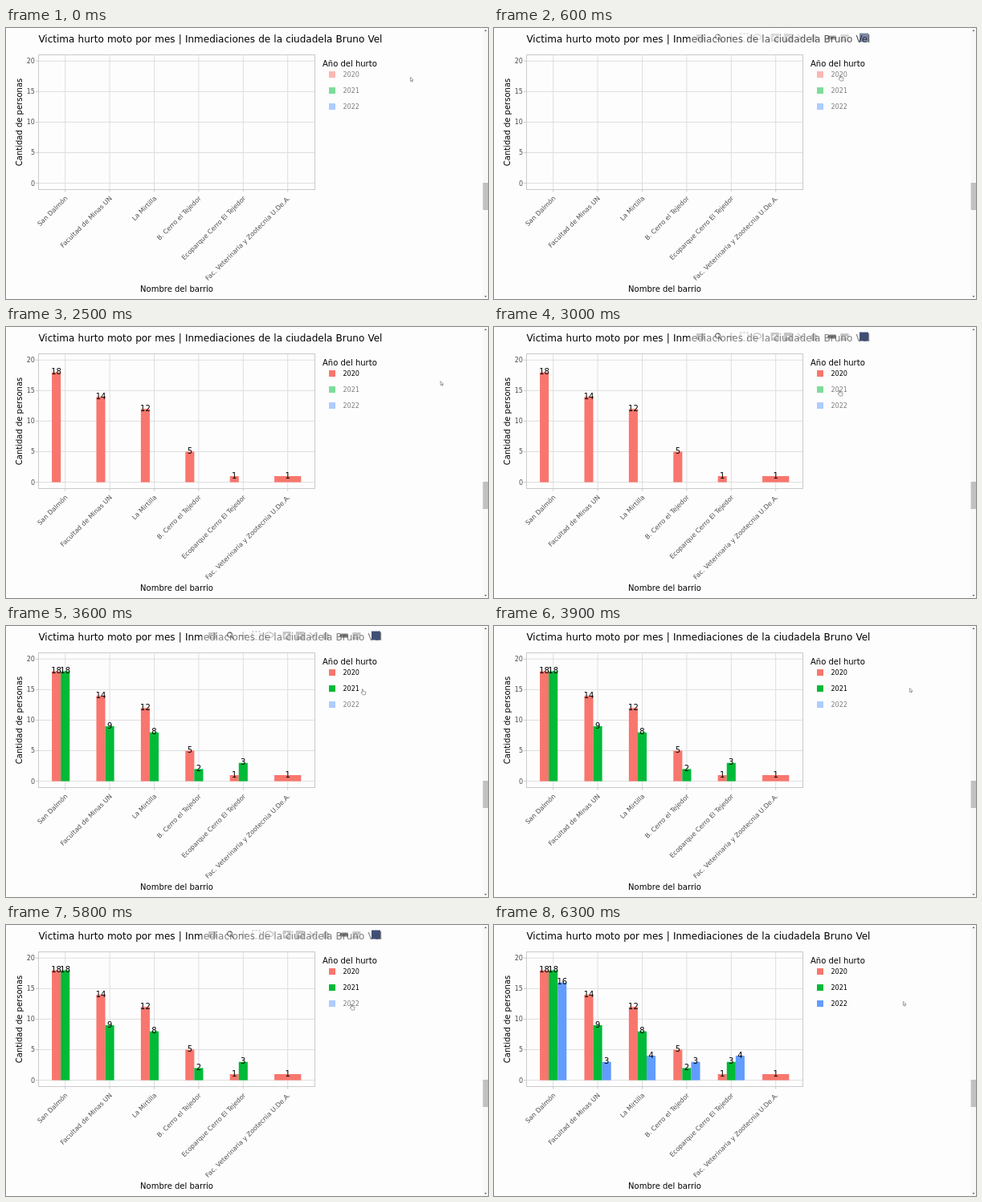
Write an HTML page that moves like this. It is 600x338 px and loops after 7000 ms.

```html
<!DOCTYPE html>
<html lang="es">
<head>
<meta charset="utf-8">
<title>Hurto de motos por barrio</title>
<style>
  html, body { margin: 0; width: 100%; height: 100%; overflow: hidden; background: #fefdfe; }
  svg { display: block; width: 600px; height: 338px; font-family: "DejaVu Sans", Verdana, sans-serif; }
  .tick { font-size: 8.05px; fill: #4d4d4d; }
  .label { font-size: 10px; }
  .title { font-size: 12px; word-spacing: .03em; }
  .key { font-size: 8.05px; }
  .end { text-anchor: end; }
  .mid { text-anchor: middle; }
  .icon { fill: #444; fill-rule: evenodd; opacity: .3; }
  .line { fill: none; stroke: #444; stroke-width: 1.3; }
  .active { opacity: .7; }
</style>
</head>
<body>
<svg id="stage" viewBox="0 0 600 338"></svg>
<script>
const BACKGROUND = '#fefdfe', GRID = '#dedede', BORDER = '#cbcbcb';
const LOOP = 7000, STEP = 100, APPROACH = 700, FADE = 300;
const STEP_X = 55.4, STEP_Y = 7.62, BAR_WIDTH = STEP_X / 5;

const places = ['San Dalmón', 'Facultad de Minas UN', 'La Mirtilla', 'B. Cerro el Tejedor',
  'Ecoparque Cerro El Tejedor', 'Fac. Veterinaria y Zootecnia U.De.A.'];

// The cursor sets out at `enter`, clicks the legend entry and comes to rest at `away`
const series = [
  { year: 2020, color: '#f8766d', values: [18, 14, 12, 5, 1, 1], enter: 0, click: 1000, away: 1700 },
  { year: 2021, color: '#00ba38', values: [18, 9, 8, 2, 3], enter: 2300, click: 3500, away: 3900 },
  { year: 2022, color: '#619cff', values: [16, 3, 4, 3, 4], enter: 4500, click: 5900, away: 6300 }
];
const rests = [[503, 61], [552, 66], [517, 77], [509, 95]];
const target = i => [429, 58.5 + 20 * i];

// Toolbar icon groups: class and path around the icon's centre
const square = 'M-5-5h10v10h-10z';
const iconGroups = [
  [['', 'M-5-4h10v8h-10zM0-2a2 2 0 1 0 .01 0z']],
  [['line active', 'M2.5-1a3 3 0 1 0-6 0a3 3 0 1 0 6 0M1.5 1l3 3.5'],
   ['line', 'M-5 0h10M0-5v10'],
   ['line" stroke-dasharray="2', square],
   ['line', 'M-3 3c-5-4 0-8 4-7s6 4 2 6s-6 0-6 1']],
  [['', square + 'M-1-3v2h-2v2h2v2h2v-2h2v-2h-2v-2z'],
   ['', square + 'M-3-1v2h6v-2z'],
   ['line', 'M-4-4l8 8M4-4l-8 8'],
   ['', 'M-5 0l5-5l5 5h-1.5v5h-7v-5z']],
  [['active', 'M-5.5 0l3-2.5h8v5h-8z'],
   ['', 'M-5-4h10v4h-10zM-5 1h8v4h-8z']]
];

const xAt = i => 73.7 + STEP_X * i;
const yAt = value => 193.6 - STEP_Y * value;
const line = (x1, y1, x2, y2, color) => `<path d="M${x1} ${y1}L${x2} ${y2}" stroke="${color}"/>`;
const rect = (x, y, w, h, fill) =>
  `<rect x="${x}" y="${y}" width="${w}" height="${h}" fill="${fill}"/>`;
const text = (x, y, cls, content, angle = 0) =>
  `<text class="${cls}" transform="translate(${x} ${y}) rotate(${angle})">${content}</text>`;

function axes() {
  const ticks = [0, 5, 10, 15, 20];
  return ticks.map(v => line(37, yAt(v), 40, yAt(v), BORDER) + line(40, yAt(v), 384, yAt(v), GRID) +
      text(36, yAt(v) + 2.9, 'tick end', v)).join('') +
    places.map((name, i) => line(xAt(i), 34, xAt(i), 201, GRID) +
      line(xAt(i), 202, xAt(i), 204.5, BORDER) +
      text(xAt(i) + 3.4, 213, 'tick end', name, -45)).join('') +
    `<rect x="40.5" y="33.5" width="344" height="168" fill="none" stroke="${BORDER}"/>`;
}

// A place with a single series gets one bar as wide as three
function bars({ color, values }, index) {
  const boxes = values.map((v, i) => {
    const alone = series.every((s, k) => k === index || s.values[i] === undefined);
    const width = alone ? 3 * BAR_WIDTH : BAR_WIDTH;
    return { v, width, x: xAt(i) + BAR_WIDTH * (alone ? -1.5 : index - 1.5) };
  });
  return '<g class="bars">' +
    boxes.map(b => rect(b.x, yAt(b.v), b.width, STEP_Y * b.v, color)).join('') +
    boxes.map(b => text(b.x + b.width / 2, yAt(b.v) + 2.7, 'label mid', b.v)).join('') + '</g>';
}

const legend = ({ year, color }, i) =>
  `<g class="entry">${rect(402, 54 + 20 * i, 8, 8, color)}${text(419.5, 61.2 + 20 * i, 'key', year)}</g>`;

function toolbar() {
  let x = 257;
  const icons = iconGroups.map(group => {
    const drawn = group.map(([cls, d], i) =>
      `<path transform="translate(${x + 16.2 * i} 12)" d="${d}" class="icon ${cls}"/>`);
    x += 16.2 * (group.length - 1) + 22;
    return drawn.join('');
  }).join('');
  return `<g id="toolbar"><g opacity=".5">${rect(244, 6, 224, 16, BACKGROUND)}</g>` +
    icons + rect(455, 6.5, 11, 11, '#3f4f75') + '</g>';
}

const cursor = `<g id="cursor" fill="#fff" stroke="#777" stroke-width=".7">
  <path id="arrow" d="M.4 .4v5l1.2-1l.8 1.8l.9-.4l-.8-1.7h1.6z"/>
  <path id="hand" d="M.6 .5h1v2.6l3.6 .8l-.6 3.6h-3.3l-2.2-3h1.5z"/></g>`;

const scrollbar = rect(593.6, 0, 6.4, 338, '#f8f8f8') + rect(593.6, 193, 6.4, 34, '#c1c1c1') +
  '<path d="M595.5 4l1.5-2l1.5 2zM595.5 334l1.5 2l1.5-2z" fill="#666"/>';

const stage = document.getElementById('stage');
stage.innerHTML = rect(0, 0, 600, 338, BACKGROUND) + axes() + series.map(bars).join('') +
  text(40.4, 18.3, 'title', 'Victima hurto moto por mes | Inmediaciones de la ciudadela Bruno Vel') +
  text(212.5, 328.5, 'label mid', 'Nombre del barrio') +
  text(19.6, 117.5, 'label mid', 'Cantidad de personas', -90) +
  text(394, 47.8, 'label', 'Año del hurto') +
  series.map(legend).join('') + toolbar() + scrollbar + cursor;

const find = id => document.getElementById(id);
const groups = stage.querySelectorAll('.bars'), entries = stage.querySelectorAll('.entry');
const parts = { toolbar: find('toolbar'), cursor: find('cursor'), arrow: find('arrow'), hand: find('hand') };
const show = (node, visible) => node.setAttribute('visibility', visible ? 'visible' : 'hidden');

const ramp = (t, from, to) => Math.min(1, Math.max(0, (t - from) / (to - from)));
const smooth = u => u * u * (3 - 2 * u);
const easeInOut = u => u < .5 ? 4 * u ** 3 : 1 - 4 * (1 - u) ** 3;
const mix = (a, b, u) => a.map((value, i) => value + (b[i] - value) * u);

function draw(now) {
  const t = Math.floor((now % LOOP) / STEP) * STEP;
  series.forEach(({ click }, i) => {
    show(groups[i], t >= click);
    entries[i].setAttribute('opacity', t >= click ? 1 : .5);
  });

  const i = series.findLastIndex(({ enter }) => t >= enter);
  const { enter, click, away } = series[i];
  const arrival = enter + APPROACH;
  const [x, y] = t < click
    ? mix(rests[i], target(i), easeInOut(ramp(t, enter, arrival)))
    : mix(target(i), rests[i + 1], smooth(ramp(t, click, away)));
  parts.cursor.setAttribute('transform', `translate(${x} ${y})`);
  show(parts.hand, x < 446);
  show(parts.arrow, x >= 446);
  parts.toolbar.setAttribute('opacity', ramp(t, arrival - FADE, arrival) - ramp(t, away - FADE, away));
}

const start = performance.now();
function tick() {
  draw(performance.now() - start);
  requestAnimationFrame(tick);
}
tick();
</script>
</body>
</html>
```
